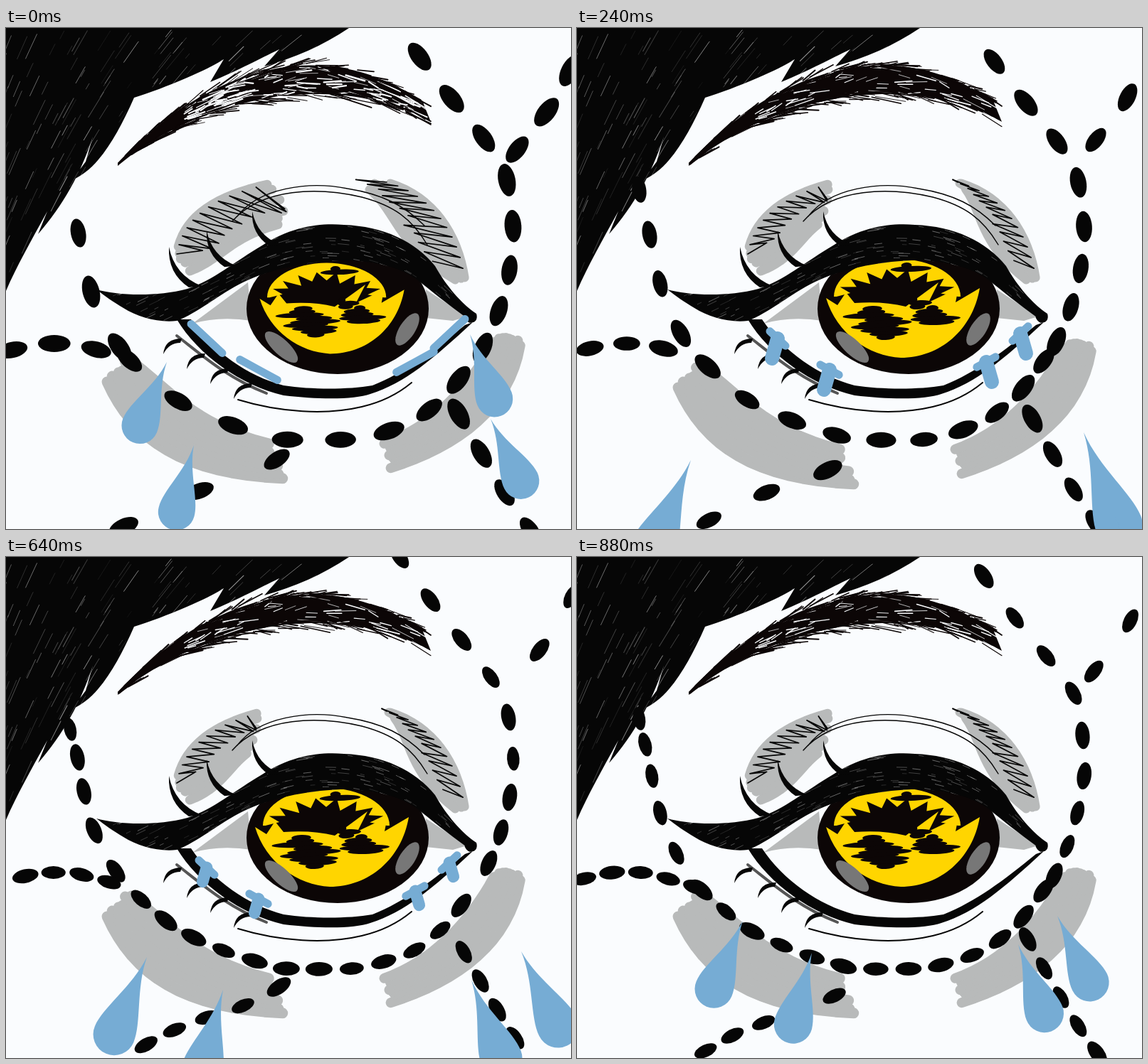
These frames come from a looping animation (794 px wide and 705 px high, 0.96 s). An HTML page with a canvas:

```html
<!DOCTYPE html>
<html lang="en">
<head>
<meta charset="utf-8">
<title>Crying eye</title>
<style>
html, body { margin: 0; width: 100%; height: 100%; overflow: hidden; background: #fafcfe; }
canvas { display: block; }
</style>
</head>
<body>
<canvas id="stage" width="794" height="705"></canvas>
<script>
const ctx = document.getElementById('stage').getContext('2d');
const BLACK = '#060606', DARK = '#0c0606', GREY = '#b8baba', YELLOW = '#ffd500', BLUE = '#76acd4', PAPER = '#fafcfe';
const STEP = 80, STEPS = 12;
ctx.lineCap = ctx.lineJoin = 'round';

let seed = 1;
const rand = (a = 0, b = 1) => {
  seed = (seed * 16807) % 2147483647;
  return a + (b - a) * seed / 2147483647;
};
const mix = (a, b, t) => a + (b - a) * t;
const mixPoint = (p, q, t) => [mix(p[0], q[0], t), mix(p[1], q[1], t)];

// Point on a cubic curve given as eight coordinates.
function bezier([ax, ay, bx, by, cx, cy, dx, dy], t) {
  const u = 1 - t, a = u * u * u, b = 3 * u * u * t, c = 3 * u * t * t, d = t * t * t;
  return [a * ax + b * bx + c * cx + d * dx, a * ay + b * by + c * cy + d * dy];
}
function fill(d, color) {
  ctx.fillStyle = color;
  ctx.fill(new Path2D(d));
}
function line(d, color, width) {
  ctx.strokeStyle = color;
  ctx.lineWidth = width;
  ctx.stroke(new Path2D(d));
}
function polyline(points, color, width) {
  ctx.beginPath();
  for (const p of points) ctx.lineTo(...p);
  ctx.strokeStyle = color;
  ctx.lineWidth = width;
  ctx.stroke();
}
const scratch = (x, y, angle, n, color, width) =>
  polyline([[x, y], [x + n * Math.cos(angle), y + n * Math.sin(angle)]], color, width);
function oval(x, y, rx, ry, angle = 0) {
  ctx.beginPath();
  ctx.ellipse(x, y, rx, ry, angle, 0, 7);
  ctx.fill();
}
function inside(d, draw) {
  ctx.save();
  ctx.clip(new Path2D(d));
  draw();
  ctx.restore();
}

// Parallel brush strokes between two curves, with uneven ends.
function brush(outer, inner, count, width, fray) {
  for (let i = 0; i < count; i++) {
    const v = i / (count - 1), from = rand(0, fray), to = 1 - rand(0, fray), points = [];
    for (let k = 0; k <= 16; k++) {
      const t = mix(from, to, k / 16);
      points.push(mixPoint(bezier(outer, t), bezier(inner, t), v));
    }
    polyline(points, GREY, width);
  }
}
// Pen line swinging between two curves; depth is how far it reaches inwards.
function zigzag(outer, inner, count, depth, skew) {
  const points = [];
  for (let i = 0; i < count * 2; i++) {
    const t = i / count / 2, s = i % 2 ? Math.min(1, t + skew) : t;
    points.push(mixPoint(bezier(outer, s), bezier(inner, s), i % 2 ? depth * rand(.7, 1) : 0));
  }
  polyline(points, BLACK, 1.7);
}

// ---- the eye
const lid = 'M127,368 C155,376 210,379 255,367 C292,355 322,328 360,306 C400,280 440,274 475,277 C530,279 575,300 603,335 C618,362 640,388 661,402 C665,414 652,420 646,407 C620,388 600,372 575,352 C550,335 510,326 470,327 C420,329 370,340 335,357 C300,374 268,402 240,412 C215,415 185,407 165,394 C150,385 140,378 127,368Z';
const lowerLid = 'M240,410 C270,460 330,503 390,517 C440,523 490,523 512,515 C560,500 600,466 656,414 L645,418 C600,455 560,485 515,503 C480,509 430,509 390,503 C340,490 290,455 260,410Z';
const hair = 'M0,0 H482 C445,25 405,42 363,54 L384,30 C355,44 330,58 287,76 L306,44 C285,58 225,84 180,98 C165,132 148,164 130,185 C118,200 105,208 92,215 L112,188 122,153 C105,205 80,250 45,290 L58,258 C35,300 15,335 0,370Z';
const bowl = 'M350,380 L366,390 378,372 390,387 Q430,384 462,392 L508,358 494,386 536,366 532,386 566,366 C556,425 510,464 455,464 C410,462 365,430 350,380Z';

function makeup(first) {
  const wide = first ? 40 : 0;
  ctx.save();
  ctx.translate(0, -wide / 5);
  brush([142, 506, 180, 590, 250, 636, 392, 642], [170, 473, 220, 505, 260, 570, 382, 596], 9, 15, .06);
  brush([724, 446, 712, 540, 640, 596, 538, 628], [690, 442, 655, 510, 600, 570, 528, 594], 9, 14, .06);
  ctx.restore();

  const left = [[240, 318, 248, 268, 290, 236, 357 + wide * .4, 219], [258, 342, 305, 325, 315, 290, 345 + wide * 1.4, 272]];
  const right = [[535, 217, 600, 235, 636, 290, 645, 354], [540 - wide, 220, 570 - wide / 2, 250, 560 - wide / 2, 300, 632, 355]];
  brush(...left, 8, 13, .1);
  brush(...right, 7, 12, .08);
  zigzag(...left, 11, first ? .8 : .5, .2);
  zigzag(...right, 12, first ? .9 : .7, -.12);
  line('M325,265 C355,225 425,215 480,226 C530,234 560,250 588,278 M318,272 C360,224 440,224 500,238 C545,250 570,268 592,305', BLACK, 1.4);
}

// A dark patch built of tapering sideways spikes.
function spikes(x, y, rx, ry) {
  ctx.fillStyle = DARK;
  for (let dy = -ry; dy <= ry; dy += 5) {
    const w = rx * Math.sqrt(1.1 - (dy / ry) ** 2);
    oval(x + dy * .6 + rand(-.3, .3) * w, y + dy, w * rand(.6, 1), 4, -.04);
  }
}

function iris(first) {
  ctx.fillStyle = DARK;
  oval(466, 395, 128, 92);
  ctx.save();
  ctx.translate(460, 394);
  if (first) ctx.scale(.94, .92);
  ctx.translate(-460, -394);

  // Upper crescent: a smooth arc outside, teeth inside.
  ctx.beginPath();
  ctx.ellipse(450, 378, 89, 53, 0, Math.PI, 0);
  for (let i = 0; i <= 18; i++) {
    const a = -Math.PI * i / 18, r = i % 2 ? rand(.42, .56) : .74;
    ctx.lineTo(450 + 89 * Math.cos(a) * (r + .22), 378 + 53 * Math.sin(a) * r);
  }
  ctx.fillStyle = YELLOW;
  ctx.fill();
  fill(bowl, YELLOW);
  spikes(425, 415, 44, 20);
  spikes(508, 406, 36, 12);
  spikes(478, 388, 20, 6);
  spikes(465, 338, 30, 4);
  ctx.restore();
  ctx.fillStyle = '#777';
  oval(387, 449, 30, 11, .75);
  oval(564, 424, 26, 11, -1);
}

function brow(first) {
  const spine = [157, 188, 262, 88, 440, 18, 597, 118];
  const at = (t, v) => {
    const [x, y] = bezier(spine, t);
    return [x, y + 4 + v * (3 + 25 * Math.sin(Math.PI * t ** 1.1 * .85))];
  };
  const strand = (t, v, len, lift, color, width) => polyline([at(t, v), at(Math.min(1, t + len), v + lift)], color, width);
  ctx.beginPath();
  for (let i = 0; i <= 80; i++) ctx.lineTo(...(i < 40 ? at(i / 40, -.75) : at(2 - i / 40, .7)));
  ctx.fillStyle = DARK;
  ctx.fill();
  for (let i = 0; i < (first ? 130 : 60); i++) strand(rand(.25, .97), rand(-.75, .75), rand(.02, .07), rand(-.2, .2), PAPER, rand(.6, first ? 2.4 : 1.6));
  for (let i = 0; i < 150; i++) {
    const side = rand() < .5 ? -1 : 1;
    strand(rand(0, .95), side * rand(.5, .85), rand(.03, .09), side * rand(0, .35), DARK, rand(.8, 2));
  }
}

function lashes() {
  for (const [x, y, s] of [[229, 308, 1], [282, 285, .9], [346, 258, .85]])
    fill(`M${x},${y} q${8 * s},${40 * s} ${46 * s},${55 * s} l${-18 * s},${2 * s} q${-30 * s},${-20 * s} ${-28 * s},${-57 * s}Z`, BLACK);
  line('M240,433 C275,460 310,492 366,514', '#555', 4);
  for (let i = 0; i < 4; i++)
    fill(`M${221 + i * 33},${459 + i * 21} q2,-22 26,-22 l-2,6 q-16,0 -24,16Z`, BLACK);
}

function face(first) {
  seed = 77;
  ctx.fillStyle = PAPER;
  ctx.fillRect(0, 0, 794, 705);
  makeup(first);
  fill('M262,416 L340,358 345,412 Q300,405 262,416Z M590,368 L648,406 628,412 590,408Z', GREY);
  iris(first);

  fill(lowerLid, BLACK);
  fill(lid, BLACK);
  line('M646,398 q14,2 13,12 q-8,8 -13,-3', BLACK, 3);
  inside(lid, () => {
    for (let i = 0; i < 420; i++) {
      const x = rand(150, 645), angle = x < 330 ? -.45 : mix(-.5, .85, (x - 330) / 310);
      scratch(x, rand(277, 412), angle, rand(5, 16), `rgba(255,255,255,${rand(.15, .6)})`, .7);
    }
  });
  lashes();
  line('M326,523 C385,541 450,545 500,533 C530,526 552,514 570,499', BLACK, 2);

  fill(hair, BLACK);
  inside(hair, () => {
    for (let i = 0; i < 260; i++) {
      const x = rand(0, 440);
      scratch(x, rand(0, 330), mix(1.95, 2.5, x / 440), rand(8, 42), `rgba(255,255,255,${rand(.1, .6)})`, rand(.4, 1.1));
    }
  });
  brow(first);
}

// ---- beads run along tracks, getting smaller and closer as the loop goes on
function track(d, offset, phase, gaps, growth = [0, 0]) {
  const path = document.createElementNS('http://www.w3.org/2000/svg', 'path');
  path.setAttribute('d', d);
  return { path, offset, phase, gaps, growth };
}
const tracks = [
  track('M87,225 L90,242 100,280 109,328 122,381 147,432 172,466', 14, -.37, [80, 36], [2, 4]),
  track('M172,466 L206,496 237,522 275,541 321,560 385,579 437,580 490,579 533,569 575,553 617,520 640,490 665,457', 2, 0, [92, 46], [-2.5, 0]),
  track('M670,450 L692,400 706,350 714,300 710,245 700,195 664,145 620,92 578,36 545,-12', 0, 0, [55, 43], [1.5, 2]),
  track('M0,455 L50,444 95,444 140,456 168,465', 9, 0, [60, 40]),
  track('M165,702 L187,692 221,672 273,651 328,634 375,611 408,588', 24, -.2, [118, 42], [0, 2]),
  track('M700,195 L709,183 735,150 770,105 800,45', 0, .45, [67, 88]),
  track('M622,518 L640,550 664,592 692,640 712,672 738,708', 0, .45, [64, 47])
];

function beads(step) {
  const late = Math.min(1, step / 8), flow = .37 * step + .008 * step * step;
  ctx.fillStyle = BLACK;
  seed = 500 + step;
  for (const { path, offset, phase, gaps, growth } of tracks) {
    const end = path.getTotalLength(), gap = mix(...gaps, late), grow = mix(...growth, late);
    const lead = flow + phase - Math.round(flow);
    for (let i = -1; i < 16; i++) {
      const u = i + lead, d = offset + gap * u + grow * u * u;
      if (d > end) break;
      if (d < 0) continue;
      const c = path.getPointAtLength(d), a = path.getPointAtLength(Math.max(0, d - 9)), b = path.getPointAtLength(Math.min(end, d + 9));
      const r = mix(22, 18, late) * rand(.92, 1.08);
      oval(c.x, c.y, r, r * .52, Math.atan2(b.y - a.y, b.x - a.x));
    }
  }
}

// ---- tears swell on the lower lid, then fall outwards in waves
const DRIFT = [-22, -14, 20, 25];
const waves = [
  { from: 0, to: 4, age: 1.5, tips: [[226, 470], [264, 587], [652, 431], [681, 550]] },
  { from: 5, to: 9, age: 0, tips: [[264, 452], [347, 498], [594, 484], [649, 444]] },
  { from: 9, to: 11, age: 0, tips: [[277, 444], [358, 489], [580, 477], [625, 437]] }
];
const wells = [[282, 437, .75], [355, 481, .5], [575, 470, -.5], [623, 430, -.75]];

function tear(x, y, length, r, lean) {
  ctx.save();
  ctx.translate(x, y);
  ctx.rotate(-lean);
  ctx.beginPath();
  ctx.moveTo(0, 0);
  ctx.bezierCurveTo(r * .1, length * .4, r, length - r, r, length);
  ctx.arc(0, length, r, 0, Math.PI);
  ctx.bezierCurveTo(-r, length - r, -r * .1, length * .4, 0, 0);
  ctx.fillStyle = BLUE;
  ctx.fill();
  ctx.restore();
}

function pools(step) {
  const swell = Math.abs(Math.sin(Math.PI * Math.max(0, step - 1) / 4)), spread = step ? 15 : 30;
  for (const [x, y, angle] of wells) {
    const dx = spread * Math.cos(angle), dy = spread * Math.sin(angle), out = -Math.sign(angle) * 8;
    polyline([[x - dx, y - dy], [x, y], [x + dx, y + dy]], BLUE, 11);
    polyline([[x, y], [x + out * swell, y + 28 * swell]], BLUE, 9 + 11 * swell);
  }
}

function tears(step) {
  const fall = age => 28 * age + 3 * age * age;
  if (step < 9) pools(step);
  for (const { from, to, age, tips } of waves) {
    if (step < from || step > to) continue;
    const now = age + step - from;
    tips.forEach(([x, y], i) =>
      tear(x + DRIFT[i] * (now - age), y + fall(now) - fall(age), 76 + 14 * now, 22 + 2.5 * now, DRIFT[i] / 55));
  }
}

let shown = -1;
function play() {
  const step = Math.floor(performance.now() / STEP) % STEPS;
  if (step !== shown) {
    face(step === 0);
    beads(step);
    tears(step);
    shown = step;
  }
  requestAnimationFrame(play);
}
play();
</script>
</body>
</html>
```
